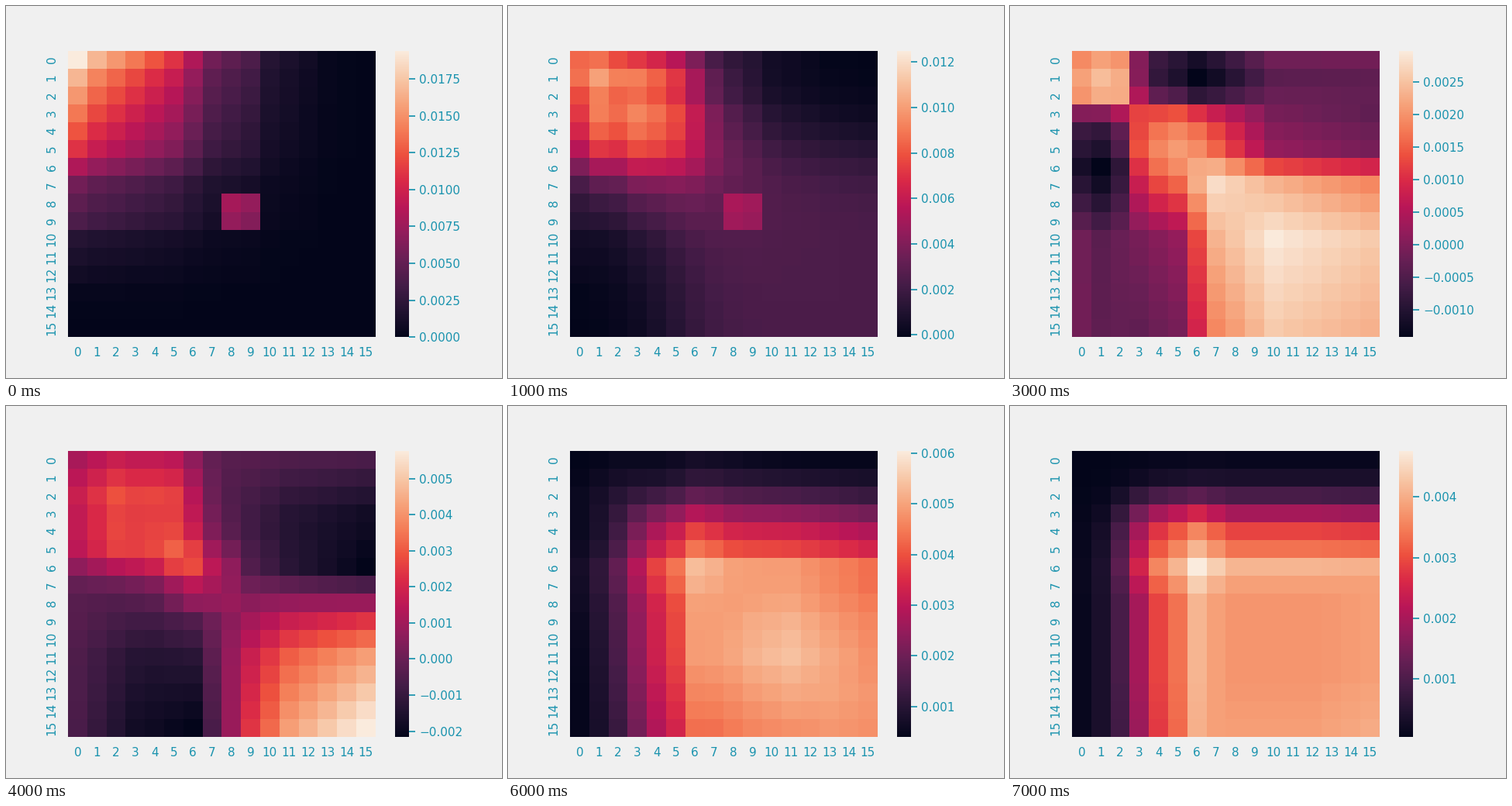
Recreate the animation shown at these times as a matplotlib script. Size 640 by 480 pixels, loop 8000 ms.

```python
import numpy as np
import matplotlib.pyplot as plt
from matplotlib.animation import FuncAnimation
from matplotlib.colors import LinearSegmentedColormap

N = 16
BG = "#f0f0f0"
INK = "#1a93ae"
cells = np.arange(N)

plt.rcParams["font.family"] = "DejaVu Sans"

CMAP = LinearSegmentedColormap.from_list("ember", [
    "#03051a", "#221331", "#451c47", "#691f55", "#921c5b", "#b91657",
    "#d92847", "#ed503e", "#f47d57", "#f6a47c", "#f7c9aa", "#faebdd"])


def path(*points):
    """Straight lines through a few (cell, height) points."""
    return np.interp(cells, *zip(*points))


def rise(center, width):
    return 1 / (1 + np.exp((center - cells) / width))


def bump(center, width, height):
    return height * np.exp(-((cells - center) / width) ** 2)


def cov(base, *modes):
    """Symmetric matrix as a sum of outer products, clipped to 0..1."""
    return np.clip(base + sum(np.outer(v, v) for v in modes), 0, 1)


corner = cov(
    0,
    path((0, 1), (1, .86), (5, .57), (7, .29), (9, .2), (10, .1), (13, .015), (15, 0)),
    path((7, 0), (8, .59), (9, .54), (10, 0)))

two_blocks = cov(
    0,
    .63 * rise(4.9, 1.2),
    .95 * rise(6.1, -.95) - bump(0, .5, .38) - bump(2, .5, .09),
    path((0, -.2), (2, .1), (3, .36), (6, .42), (8, .28), (11, .1), (15, 0)))

ridge = cov(
    .32,
    path((0, -.04), (1, -.1), (5, .06), (7, .65), (10, .82), (15, .72)),
    path((0, .66), (1, .74), (2, .69), (3, .02), (4, -.25), (6, -.38), (10, 0)),
    path((1, 0), (2, .18), (3, .53), (5, .61), (10, 0), (15, -.1)))

opposed = cov(
    .27,
    path((0, -.09), (3, -.26), (6, -.31), (9, .35), (11, .62), (15, .86)),
    path((0, .36), (2, .56), (3, .5), (5, .52), (7, .05), (8, 0)),
    path((2, -.1), (4, 0), (6, .42), (8, .3), (9, .12), (15, 0)))

plateau = cov(
    -.107,
    path((0, .11), (2, .28), (5, .57), (6, .79), (9, .98), (11, 1.05), (15, .81)),
    path((0, .22), (6, .49), (7, .43), (9, .17), (11, .03)),
    path((0, .2), (2, .28), (4, 0)),
    path((11, 0), (13, .28), (15, .4)))

shelf = cov(
    0,
    .87 * rise(2.75, .75) + bump(6.2, .8, .15),
    path((1, 0), (3, -.2), (5, -.18), (7, .02), (8, .16), (12, .16), (15, .28)))

# matrix, low and high end of the colour scale
STATES = [
    (corner, 0, .01942),
    ((corner + two_blocks) / 2, -.0001, .0125),
    (two_blocks, -.00006, .00772),
    (ridge, -.001418, .002982),
    (opposed, -.0021625, .0057725),
    (plateau, .000758, .00781),
    ((plateau + shelf) / 2, .0004, .006046),
    (shelf, .000048, .004757),
]

fig, ax = plt.subplots(figsize=(6.4, 4.8), dpi=100, facecolor=BG)
mesh = ax.pcolormesh(corner, cmap=CMAP)
ax.set(xlim=(0, N), ylim=(N, 0))
ax.spines[:].set_visible(False)
ax.set_xticks(cells + .5, cells)
ax.set_yticks(cells + .5, cells, rotation="vertical", va="center")
ax.tick_params(length=0, pad=9.5, labelsize=11, labelcolor=INK)

bar = fig.colorbar(mesh, ax=ax)
bar.outline.set_visible(False)
bar.ax.tick_params(length=6, width=1.25, pad=3.5, labelsize=11,
                   color=INK, labelcolor=INK)


def draw(i):
    t, lo, hi = STATES[i]
    mesh.set_array(lo + t * (hi - lo))
    mesh.set_clim(lo, hi)  # the bar picks its ticks from these limits
    return mesh,


anim = FuncAnimation(fig, draw, frames=len(STATES), interval=1000,
                     repeat=True, repeat_delay=0, blit=False)
plt.show()
```
